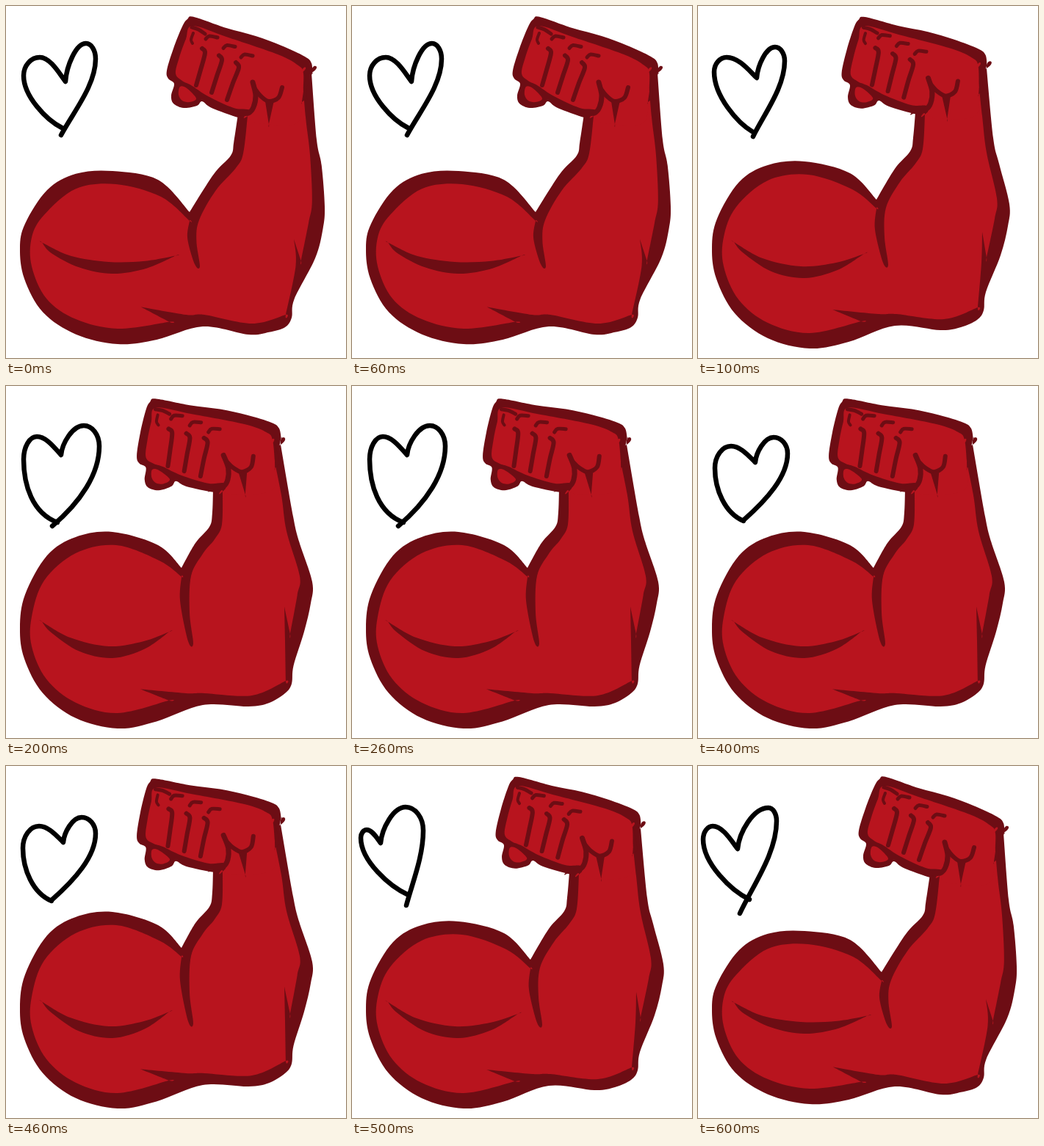
An HTML page with a canvas for the animation above (0.7 s loop, 463 by 480 pixels).

```html
<!DOCTYPE html>
<html lang="en">
<head>
<meta charset="utf-8">
<title>Flexing arm</title>
<style>
html, body { margin: 0; width: 100%; height: 100%; overflow: hidden; background: #fff; }
canvas { display: block; width: 463px; height: 480px; }
</style>
</head>
<body>
<canvas id="stage" width="463" height="480"></canvas>
<script>
const ctx = document.getElementById('stage').getContext('2d');
const DARK = '#6d0d14', RED = '#b8141e', STEP = 100;

// Arm outlines in the half-flexed pose; a repeated point makes a corner.
const edge = [393,85, 393,85, 402,180, 410,215, 424,270, 422,300, 412,340, 392,390, 389,415,
  380,428, 358,438, 330,442, 268,436, 205,458, 152,467, 95,453, 50,419, 25,372, 19,330, 26,290,
  56,240, 95,217, 145,212, 207,228, 243,264, 243,264, 268,222, 289,198, 293,180, 296,145, 296,145];
const skin = [380,85, 380,85, 387,150, 393,200, 407,262, 404,290, 393,343, 393,343, 387,308, 387,308,
  386,350, 381,411, 381,411, 335,427, 270,420, 245,420, 183,414, 183,414, 222,430, 222,430,
  152,446, 95,432, 55,400, 35,355, 35,315, 52,274, 95,238, 150,230, 210,250, 243,276, 243,276,
  241,305, 252,350, 259,353, 254,315, 256,275, 275,240, 296,215, 306,195, 309,148, 309,148];
const crease = [49,322, 49,322, 88,344, 140,355, 188,350, 226,338, 226,338, 190,360, 145,371,
  100,362, 62,337];

// Rig handles: x, y, shift when relaxed, shift when fully flexed
const rig = [
  395,100, 23,6, -19,-5,
  402,180, 21,2, -11,-2,
  424,280, 10,3, -7,-3,
  409,350, 9,4, -6,-5,
  389,412, 0,10, 0,-9,
  330,441, 0,6, 0,-5,
  262,432, 0,1, 0,-1,
  152,465, 0,-6, 0,0,
  20,345, 0,0, 0,0,
  50,247, 0,11, 0,-9,
  145,212, 0,13, 0,-13,
  207,228, 0,9, 0,-11,
  243,264, 7,17, -4,-16,
  289,198, 17,6, -12,-6,
  300,148, 20,2, -14,-4,
  258,353, 5,2, -4,-2,
  137,363, 0,-6, 0,0,
  387,308, 5,10, -8,-7
];

const fistEdge = [247,18, 256,15, 300,30, 340,41, 375,54, 407,69, 416,78, 417,92, 417,92, 400,120,
  345,130, 341,145, 330,153, 316,152, 280,139, 267,130, 260,136, 242,139, 228,133, 225,122,
  229,106, 221,99, 219,88, 228,58, 240,28];
const fistSkin = [254,27, 300,42, 370,66, 398,81, 405,92, 404,122, 404,122, 396,160, 345,160,
  331,154, 331,154, 332,142, 310,139, 275,123, 252,108, 240,102, 231,92, 236,70, 245,45];

// Smooth curve through x,y pairs
function trace(p, closed) {
  const n = p.length / 2;
  const at = i => {
    i = closed ? (i + n) % n : Math.max(0, Math.min(n - 1, i));
    return [p[2 * i], p[2 * i + 1]];
  };
  ctx.beginPath();
  ctx.moveTo(p[0], p[1]);
  for (let i = 0; i < (closed ? n : n - 1); i++) {
    const [a, b, c, d] = [at(i - 1), at(i), at(i + 1), at(i + 2)];
    ctx.bezierCurveTo(
      b[0] + (c[0] - a[0]) / 6, b[1] + (c[1] - a[1]) / 6,
      c[0] - (d[0] - b[0]) / 6, c[1] - (d[1] - b[1]) / 6, c[0], c[1]);
  }
  if (closed) ctx.closePath();
}

function fill(p, color) {
  trace(p, true);
  ctx.fillStyle = color;
  ctx.fill();
}

function stroke(color, width) {
  ctx.strokeStyle = color;
  ctx.lineWidth = width;
  ctx.lineCap = ctx.lineJoin = 'round';
  ctx.stroke();
}

function mark(width, ...p) {
  trace(p, false);
  stroke(DARK, width);
}

// Move points with the nearby handles; flex is 0, 1 or 2.
function bend(p, flex) {
  if (flex === 1) return p;
  const k = flex === 0 ? 2 : 4, out = [];
  for (let i = 0; i < p.length; i += 2) {
    let sum = 0, dx = 0, dy = 0;
    for (let h = 0; h < rig.length; h += 6) {
      const d = (p[i] - rig[h]) ** 2 + (p[i + 1] - rig[h + 1]) ** 2 + 1;
      const w = 1 / (d * d);
      sum += w;
      dx += w * rig[h + k];
      dy += w * rig[h + k + 1];
    }
    out.push(p[i] + dx / sum, p[i + 1] + dy / sum);
  }
  return out;
}

function withFist(flex, draw) {
  ctx.save();
  ctx.translate(290 - 23.5 * flex + 2.7 * flex * (flex - 1), 88 - 2.5 * Math.min(flex, 1.2));
  ctx.rotate(-4 * flex * Math.PI / 180);
  ctx.translate(-290, -88);
  draw();
  ctx.restore();
}

function drawFingers() {
  fill(fistSkin, RED);
  fill([237,110, 246,112, 259,126, 250,131, 240,129, 235,121], RED);
  mark(5, 253,29, 262,32, 271,38);
  mark(4, 255,37, 252,46, 254,51);
  for (let i = 0; i < 3; i++) {
    const x = 24 * i, y = 12.5 * i;
    mark(5, 272 + x, 45 + y, 277 + x, 41 + y, 288 + x, 43 + y);
    mark(6, 267 + 23 * i, 58 + 9.5 * i, 271 + 23 * i, 64 + 10 * i,
      265 + 22 * i, 87 + 9 * i, 259 + 21 * i, 108 + 10 * i);
  }
  mark(7, 318,146, 330,146, 337,138, 340,122, 336,104);
  mark(6, 339,113, 347,123, 358,130, 371,125, 376,111);
  fill([353,130, 353,130, 365,129, 365,129, 358,161, 358,161], DARK);
  fill([408,96, 408,96, 403,131, 403,131, 410,126, 410,126], DARK);
}

function drawArm(flex) {
  fill(bend(edge, flex), DARK);
  withFist(flex, () => fill(fistEdge, DARK));
  fill(bend(skin, flex), RED);
  withFist(flex, drawFingers);
  fill(bend(crease, flex), DARK);
}

// Left tail, left side, left top, notch, right top, right side, right tail, roundness
const hearts = [
  [76,166, 24,95, 46,70, 81,103, 109,51, 122,72, 75,176, 0],
  [75,172, 22,90, 39,70, 80,98, 105,56, 118,75, 75,178, 0],
  [70,186, 24,100, 42,69, 75,94, 106,54, 127,82, 63,191, 16],
  [68,176, 22,92, 36,73, 75,101, 108,53, 124,73, 51,210, 0],
  [62,184, 23,112, 45,82, 78,104, 103,70, 122,92, 62,183, 10],
  [77,176, 12,98, 20,87, 39,105, 73,56, 97,88, 74,190, 0],
  [70,182, 7,100, 20,82, 54,113, 96,57, 107,75, 57,201, 0]
];

function drawHeart([sx, sy, lx, ly, px, py, nx, ny, qx, qy, rx, ry, ex, ey, round]) {
  const mix = (a, b, t) => a + (b - a) * t;
  ctx.beginPath();
  ctx.moveTo(sx, sy);
  ctx.bezierCurveTo(mix(sx, lx, .4) - round, mix(sy, ly, .15), lx, mix(ly, sy, .4), lx, ly);
  ctx.bezierCurveTo(lx, mix(ly, py, .55), mix(px, lx, .55), py, px, py);
  ctx.bezierCurveTo(mix(px, nx, .4), py, mix(nx, px, .25), mix(ny, py, .35), nx, ny);
  ctx.bezierCurveTo(mix(nx, qx, .05), mix(ny, qy, .4), mix(qx, nx, .5), qy, qx, qy);
  ctx.bezierCurveTo(mix(qx, rx, .55), qy, rx, mix(ry, qy, .55), rx, ry);
  ctx.bezierCurveTo(rx, mix(ry, ey, .35), mix(ex, rx, .35) + round, mix(ey, ry, .3), ex, ey);
  stroke('#000', 6.5);
}

const flexes = [0, 1, 2, 1, 2, 1, 0];
const start = performance.now();

function render(now) {
  const i = Math.floor(Math.max(0, now - start) / STEP) % flexes.length;
  ctx.fillStyle = '#fff';
  ctx.fillRect(0, 0, 463, 480);
  drawArm(flexes[i]);
  drawHeart(hearts[i]);
  requestAnimationFrame(render);
}

render(start);
</script>
</body>
</html>
```
